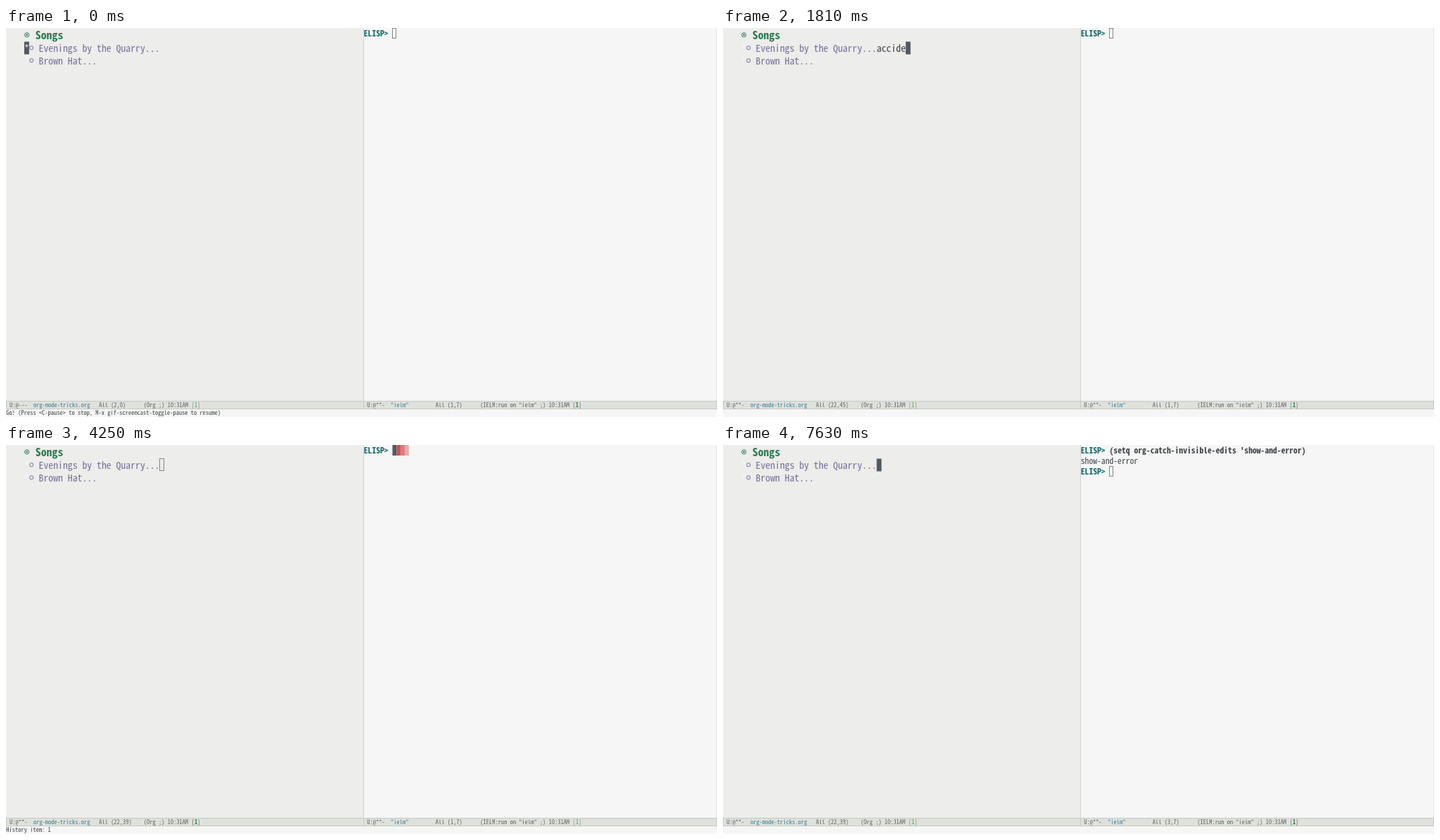
An HTML page for the animation above (8000 ms loop, 1011 by 554 pixels).

```html
<!DOCTYPE html>
<html lang="en">
<head>
<meta charset="utf-8">
<title>Editor session</title>
<style>
  html, body { margin: 0; width: 100%; height: 100%; overflow: hidden; background: #f6f6f6; }
  svg { display: block; }
  text { white-space: pre; font-family: "Noto Sans Mono CJK JP", "Noto Sans Mono CJK SC", "Noto Sans Mono", monospace; }
</style>
</head>
<body>
<svg id="stage" width="1011" height="554" viewBox="0 0 1011 554"></svg>
<script>
const LOOP = 8000;
const DARK = '#505a5f', INK = '#3b3f42', TEAL = '#11696b', GREEN = '#2a7a50',
      PURPLE = '#766d9a', GOLD = '#d0a048', BAR_INK = '#58615f', HIDDEN = '#f5f5f4';
// Character cell widths: heading, outline, shell, status bars.
const HEAD = 7.9, ITEM = 6.88, SHELL = 5.82, BAR = 4.24;
const FOLD_X = 218.5, INPUT_X = 549.5;
const stage = document.getElementById('stage');

// Font size per unit of cell width, so that the glyphs fill the grid.
const pen = document.createElement('canvas').getContext('2d');
pen.font = '100px ' + getComputedStyle(stage.appendChild(
  document.createElementNS('http://www.w3.org/2000/svg', 'text'))).fontFamily;
const emPerCell = 100 / pen.measureText('0').width;

const escape = s => s.replace(/&/g, '&amp;').replace(/</g, '&lt;');
const text = (x, y, cell, str, fill, bold) =>
  `<text x="${x}" y="${y}" font-size="${cell * emPerCell}" fill="${fill}"` +
  `${bold ? ' font-weight="700"' : ''}>${escape(str)}</text>`;
const rect = (x, y, w, h, fill) =>
  `<rect x="${x}" y="${y}" width="${w}" height="${h}" fill="${fill}"/>`;
const ring = (x, y, r, color) =>
  `<circle cx="${x}" cy="${y}" r="${r}" fill="none" stroke="${color}"/>`;

function cursor(x, y, w, h, solid) {
  return solid ? rect(x, y, w, h, DARK)
    : `<rect x="${Math.floor(x) + .5}" y="${Math.floor(y) + .5}" width="${Math.floor(w)}"` +
      ` height="${h - 1}" fill="none" stroke="#838788"/>`;
}

// Each part is [column, text, colour].
function statusBar(x, parts, endCol, active) {
  const put = (col, str, fill, bold) => text(x + col * BAR, 540, BAR, str, fill, bold);
  return parts.map(([col, str, fill]) => put(col, str, fill || BAR_INK)).join('') +
    put(endCol, '[ ]', active ? '#7b8681' : BAR_INK) +
    put(endCol + 1, '1', active ? '#4a9a55' : '#1e8136', !active);
}

const keys = [940, 1100, 1290, 1540, 1700, 1810, 2120, 2830];
const lengths = [1, 2, 3, 4, 5, 6, 7, 10];

function sceneAt(t) {
  const typed = lengths[keys.filter(k => t >= k).length - 1] || 0;
  const back = t >= 3420;
  return {
    word: t < 3970 ? 'accidental'.slice(0, typed) : '',
    start: t < 630,
    back: back && t < 3970,
    col: 39 + (back ? 0 : typed),
    flags: t < 940 ? '---' : '**-',
    leftActive: t < 4250 || t >= 7630,
    pulse: t >= 4250 && t < 4740,
    input: t < 4740 || t >= 6350 ? ''
      : `(setq org-catch-invisible-edits '${t < 5380 ? 'nil' : 'show-and-error'})`,
    done: t >= 6350,
    echo: t < 630 ? 'Go! (Press <C-pause> to stop, M-x gif-screencast-toggle-pause to resume)'
      : t >= 4250 && t < 6350 ? 'History item: ' + (t < 4740 ? 1 : 2) : ''
  };
}

function panes() {
  return rect(0, 0, 508, 531, '#ededeb') + rect(508, 0, 1, 531, '#d3d4d2') +
    rect(1010, 0, 1, 531, '#e4e4e3') +
    rect(0, 531, 1011, 12, '#dfe1dc') + rect(0, 531, 1011, 1, '#c3cac2') +
    rect(0, 542, 1011, 1, '#c3cac2') + rect(0, 531, 1, 12, '#c3cac2') +
    rect(508, 531, 1, 12, '#c3cac2') + rect(1010, 531, 1, 12, '#c3cac2');
}

function outline(s) {
  let out = ring(29.7, 9.8, 3.1, GREEN) + `<circle cx="29.7" cy="9.8" r="1.3" fill="${GREEN}"/>` +
    text(41.8, 15.5, HEAD, 'Songs', GREEN, true);
  ['Evenings by the Quarry...', 'Brown Hat...'].forEach((title, i) => {
    out += text(26, 34 + 18 * i, ITEM, '*', HIDDEN) + ring(36.2, 28.3 + 18 * i, 2.6, PURPLE) +
      text(46.6, 34 + 18 * i, ITEM, title, PURPLE);
  });
  out += text(FOLD_X, 34, ITEM, s.word, INK);
  if (s.back) out += rect(FOLD_X + ITEM, 34.8, 9 * ITEM, 1, '#e0707c');
  const x = s.start ? 26 : FOLD_X + (s.back ? 0 : s.word.length * ITEM);
  out += cursor(x, 19.5, ITEM, 18, s.leftActive);
  if (s.start || s.back) out += text(x, 34, ITEM, s.start ? '*' : 'a', '#ededeb');
  return out;
}

function shell(s) {
  const prompt = y => text(508.8, y, SHELL, 'ELISP>', TEAL, true);
  let out = prompt(12);
  if (s.done) {
    out += text(INPUT_X, 12, SHELL, "(setq org-catch-invisible-edits 'show-and-error)", INK, true) +
      text(508.8, 27, SHELL, 'show-and-error', INK) + prompt(42);
  } else if (s.input) {
    const n = s.input.length;
    out += text(INPUT_X, 12, SHELL, '(', GOLD) +
      text(INPUT_X + SHELL, 12, SHELL, s.input.slice(1, -1), INK) +
      text(INPUT_X + (n - 1) * SHELL, 12, SHELL, ')', GOLD);
  }
  if (s.pulse) ['#c9525a', '#db7b7e', '#eaa9aa'].forEach((c, i) => {
    out += rect(INPUT_X + (i + 1) * SHELL, 0, SHELL, 15, c);
  });
  return out + cursor(INPUT_X + s.input.length * SHELL, s.done ? 30 : 0, SHELL, 15, !s.leftActive);
}

function bars(s) {
  const pos = s.start ? '(2,0)' : `(22,${s.col})`;
  const shellPos = `(${s.done ? 3 : 1},${7 + s.input.length})`;
  return statusBar(5, [
    [0, 'U:@' + s.flags], [8, 'org-mode-tricks.org', '#397f96'],
    [30, 'All ' + pos], [45, '(Org ;) 10:31AM']
  ], 61, s.leftActive) + statusBar(513.2, [
    [0, 'U:@**-'], [8, '"ielm"', '#397f96'],
    [23, 'All ' + shellPos], [38, '(IELM:run on "ielm" ;) 10:31AM']
  ], 69, !s.leftActive) + text(.3, 551.3, BAR, s.echo, INK);
}

let shown = '';
function frame() {
  const s = sceneAt(performance.now() % LOOP);
  const key = JSON.stringify(s);
  if (key !== shown) {
    stage.innerHTML = panes() + outline(s) + shell(s) + bars(s);
    shown = key;
  }
  requestAnimationFrame(frame);
}
frame();
</script>
</body>
</html>
```
